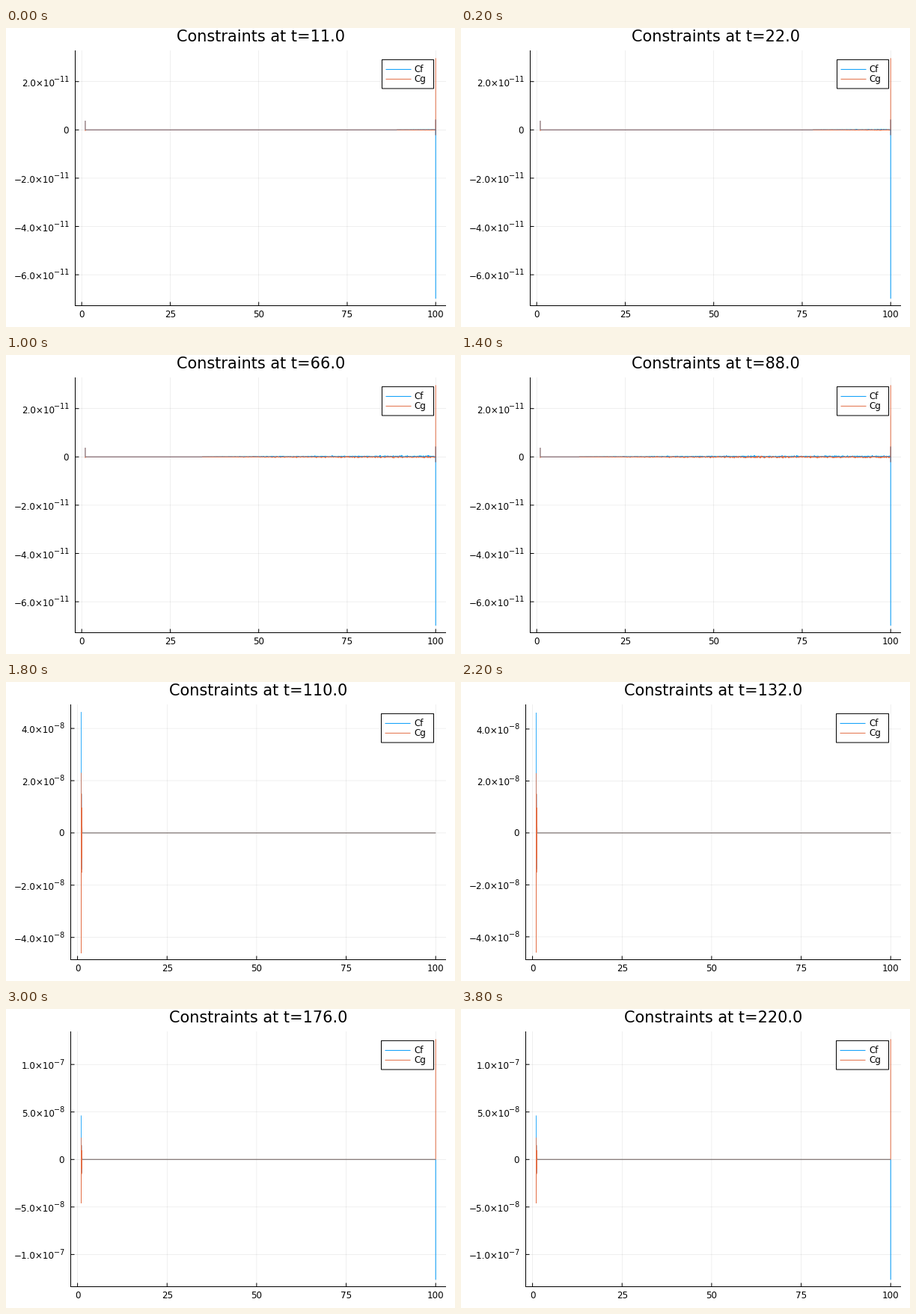
A matplotlib script for the animation above (4 s loop, 600 by 400 pixels).

```python
import numpy as np
import matplotlib.pyplot as plt
from matplotlib.animation import FuncAnimation
from matplotlib.patches import Rectangle

plt.rcParams["font.family"] = "DejaVu Sans"
plt.rcParams["path.simplify"] = False

W, H, DPI = 600, 400, 100
FRAMES, STEP_MS, DT = 20, 200, 11.0
PX = 72 / DPI  # points per pixel
BLUE, ORANGE = "#009afa", "#e36f47"
TOP, BOTTOM, RIGHT = 30, 371.5, 588
X_END = 574.2

# Oscillation at the inner boundary, in units of 1e-8
CF_BURST = [4.63, -2.4, 1.5, -1.4, 0.95, -0.9, 0.4, 0]
CG_BURST = [2.3, -4.6, 1.5, -1.52, 0.97, -0.97, 0.4, 0]

fig = plt.figure(figsize=(W / DPI, H / DPI), dpi=DPI, facecolor="white")
ax = fig.add_axes([0, 0, 1, 1])


def line(x, y, color, width=1.0, **kw):
    ax.plot(x, y, color=color, lw=width * PX, solid_capstyle="butt",
            solid_joinstyle="bevel", snap=False, **kw)


def text(x, y, s, size=11.9, ha="center", **kw):
    ax.text(x, y, s, fontsize=size * PX, ha=ha, va="baseline", color="black",
            **kw)


def y_label(x, y, value, power):
    if value == 0:
        text(x, y + 4.4, "0", ha="right")
        return
    sign = "−" if value < 0 else ""
    text(64.8, y + 6, f"{sign}{abs(value):.1f}×10", ha="right")
    text(x, y + 0.4, f"−{power}", size=9.6, ha="right")


def draw_axes(left, x_pos, y_pos, ticks, title):
    """ticks: (position, mantissa, power) triples."""
    xs = [(v, x_pos(v)) for v in range(0, 101, 25)]
    for _, x in xs:
        line([x, x], [TOP, BOTTOM], "black", 0.6, alpha=0.1)
    for v, _, _ in ticks:
        line([left, RIGHT], [y_pos(v)] * 2, "black", 0.6, alpha=0.1)
    line([left, left], [TOP, BOTTOM + 0.5], "black")
    line([left - 0.5, RIGHT], [BOTTOM, BOTTOM], "black")
    for v, x in xs:
        line([x, x], [BOTTOM - 5, BOTTOM], "black")
        text(x, 387.4, str(v))
    for v, mantissa, power in ticks:
        y = y_pos(v)
        line([left, left + 5], [y, y], "black")
        y_label(left - 8.4, y, mantissa, power)
    text((left + RIGHT) / 2, 18.2, title, size=20.85)


def draw_legend(x):
    ax.add_patch(Rectangle((x, 42.4), 571.5 - x, 38.6, fc="white", ec="black",
                           lw=PX, zorder=3, snap=False))
    for name, color, y in (("Cf", BLUE, 55.4), ("Cg", ORANGE, 68.4)):
        line([x + 5, x + 39], [y, y], color, zorder=4)
        text(545.4, y + 4, name, ha="left", zorder=4)


def draw_noise(t, x_pos, y_pos, rng):
    """Small errors spreading inwards from the outer boundary."""
    front = max(100 - t, 1)
    x = np.arange(front, 99.9, 0.1)
    amp = 0.034 * np.clip((x - front) / 42, 0, 1) ** 0.8
    cf = amp * np.abs(rng.normal(0, 0.65, x.size))
    cg = amp * rng.normal(-0.3, 0.5, x.size)
    line(x_pos(x), y_pos(cf), BLUE)
    line(x_pos(x), y_pos(cg), ORANGE)


def draw_early(i, t, title):
    left = 92.5
    x_pos = lambda v: 101.2 + 4.73 * v
    y_pos = lambda v: 136.3 - 32.3 * v
    ticks = [(v, v, 11) for v in (2, 0, -2, -4, -6)]
    draw_axes(left, x_pos, y_pos, ticks, title)
    dark = "#80656a"
    line([x_pos(1), X_END], [y_pos(0)] * 2, dark, 1.2)
    draw_noise(t, x_pos, y_pos, np.random.default_rng(i))
    line([x_pos(1)] * 2, [y_pos(0.38), y_pos(0)], dark, 1.2)
    line([x_pos(1)] * 2, [y_pos(0), y_pos(-0.05)], ORANGE)
    line([X_END] * 2, [y_pos(0), y_pos(-6.99)], BLUE)
    line([X_END] * 2, [y_pos(2.97), y_pos(0)], ORANGE)
    line([X_END] * 2, [y_pos(0.43), y_pos(-0.22)], dark, 1.2)
    draw_legend(502.5)


def draw_late(i, title):
    left = 86.5
    x_pos = lambda v: 95.6 + 4.786 * v
    outer = i >= 12
    if outer:
        zero, scale = 201.3, 12.71
        ticks = [(10, 1, 7), (5, 5, 8), (0, 0, 8), (-5, -5, 8), (-10, -1, 7)]
    else:
        zero, scale = 201.9, 34.95 - 0.1 * (i - 9)
        ticks = [(v, v, 8) for v in (4, 2, 0, -2, -4)]
    y_pos = lambda v: zero - scale * v
    draw_axes(left, x_pos, y_pos, ticks, title)
    line([x_pos(1.3), X_END], [y_pos(0)] * 2, "#857a78", 1.3)
    x = x_pos(1 + 0.04 * np.arange(len(CF_BURST)))
    for burst, color in ((CF_BURST, BLUE), (CG_BURST, ORANGE)):
        line(x, y_pos(np.array(burst)), color, 0.8)
    if outer:
        line([X_END] * 2, [y_pos(0), y_pos(-12.66)], BLUE)
        line([X_END] * 2, [y_pos(12.66), y_pos(0)], ORANGE)
    draw_legend(501.5)


def draw(i):
    ax.cla()
    ax.set(xlim=(0, W), ylim=(H, 0))
    ax.axis("off")
    t = DT * (i + 1)
    title = f"Constraints at t={t:.1f}"
    if i < 9:
        draw_early(i, t, title)
    else:
        draw_late(i, title)
    return []


anim = FuncAnimation(fig, draw, frames=FRAMES, interval=STEP_MS,
                     init_func=lambda: [], repeat=True, repeat_delay=0)
plt.show()
```
